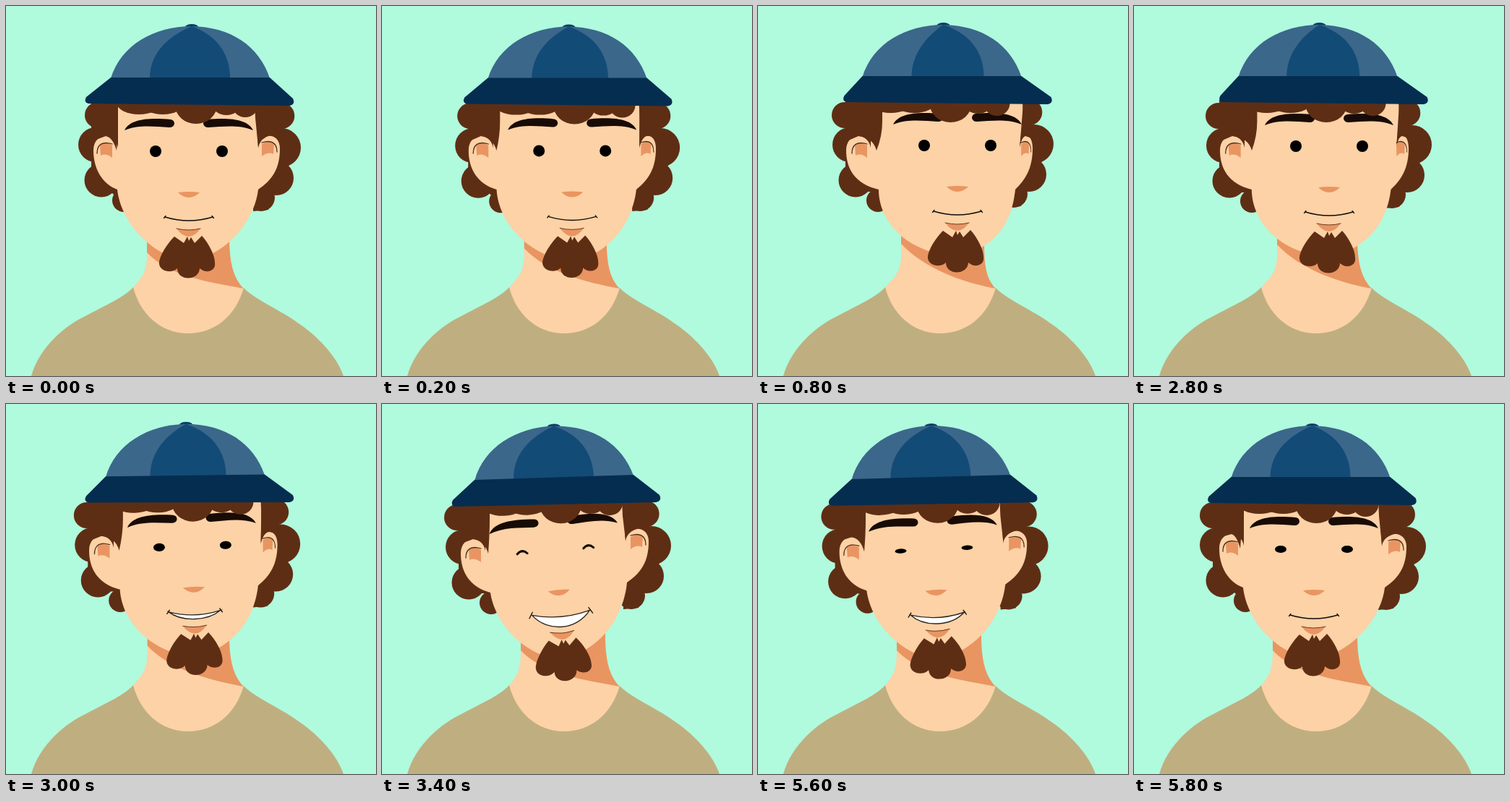
An HTML page with a canvas for the animation above (6000 ms loop, 512 by 512 pixels).

```html
<!DOCTYPE html>
<html lang="en">
<head>
<meta charset="utf-8">
<title>Portrait</title>
<style>
  html, body { margin: 0; width: 100%; height: 100%; overflow: hidden; background: #b0fade; }
  canvas { display: block; width: 512px; height: 512px; }
</style>
</head>
<body>
<canvas id="stage" width="512" height="512"></canvas>
<script>
const ctx = document.getElementById('stage').getContext('2d');
const SKIN = '#fcd2a6', SHADE = '#e99562', HAIR = '#5e2e14', INK = '#120c0a';

// Poses
const FIELDS = ('hatX hatY hatRot brim topL hairL hairR yL yR earL earR ' +
  'tipL tipR neckL neckR noseX noseY turn smile lid').split(' ');
const pose = (...values) => Object.fromEntries(FIELDS.map((name, i) => [name, values[i]]));
const mix = (a, b, k) => pose(...FIELDS.map(name => a[name] + (b[name] - a[name]) * k));
const pick = (p, names) => Object.fromEntries(names.map(name => [name, p[name]]));

const front  = pose(255, 99, 0, 0, 109, 100, 408, -2, 0, 121, 379, 153, 349, 195, 309, 253, 261, 0, 0, 0);
const turned = pose(257.5, 100, 0, 3, 101, 102, 415, 0, 0, 119, 379, 162, 361, 198, 312, 270, 260, .8, 0, 0);
const raised = pose(254.5, 97, 0, 9, 102, 103, 409, -2, -5, 122, 380, 164, 362, 198, 313, 276, 253, 1, 0, 0);
const back   = pose(254.5, 97, 0, 9, 99, 100, 412, -1, -4, 119, 380, 163, 363, 198, 309, 270, 254, .9, 0, 0);
const laugh  = pose(238, 101.5, -.032, 3, 86, 88, 400, 4, 0, 109, 369, 147, 337, 192, 309, 245, 261, 0, 1, 1);
const blink  = pose(244.5, 101, 0, 3, 91, 91, 404, 1, 1, 118, 377, 147, 343, 192, 309, 249, 261, 0, 0, .5);
const tipped = { ...laugh, hatX: 236, hatY: 101, hatRot: -.044, topL: 85, hairL: 87 };

const LOOP = 6000;
const timeline = [
  [0, front],
  [200, mix(front, turned, .6)],
  [400, turned],
  [600, { ...mix(turned, raised, .5), ...pick(turned, FIELDS.slice(0, 9)) }],
  [800, raised],
  [2800, back],
  [3000, mix(back, laugh, .4)],
  [3200, mix(back, laugh, .75)],
  [3400, laugh],
  [5400, tipped],
  [5600, mix(tipped, blink, .4)],
  [5800, blink],
];

// Drawing helpers
function fill(color, d) {
  ctx.fillStyle = color;
  ctx.fill(new Path2D(d));
}

function line(d, width = 1.3, color = INK) {
  ctx.strokeStyle = color;
  ctx.lineWidth = width;
  ctx.lineCap = 'round';
  ctx.stroke(new Path2D(d));
}

function oval(color, x, y, rx, ry = rx) {
  ctx.fillStyle = color;
  ctx.beginPath();
  ctx.ellipse(x, y, rx, ry, 0, 0, 7);
  ctx.fill();
}

function group(x, y, angle, scaleX, draw) {
  ctx.save();
  ctx.translate(x, y);
  ctx.rotate(angle);
  ctx.scale(scaleX, 1);
  draw();
  ctx.restore();
}

function drawHair({ topL, hairL: l, hairR: r, yL, yR }) {
  fill(HAIR, `M${l + 18} 130H${r - 30}V${245 + yR}L${r - 40} ${262 + yR}H${l + 50}L${l + 18} 230Z`);
  oval(HAIR, topL + 18, 153 + yL, 18);
  oval(HAIR, l + 24, 194 + yL, 24);
  oval(HAIR, l + 32, 243 + yL, 23.5);
  oval(HAIR, l + 63, 271 + yL, 16);
  oval(HAIR, r - 33 + (topL - l) * .7, 152 + yR, 18);
  oval(HAIR, r - 27, 196 + yR, 27);
  oval(HAIR, r - 34, 238 + yR, 24);
  oval(HAIR, r - 55, 265 + yR, 19);
  fill(HAIR, `M${r - 66} ${240 + yR}v44l21-2l7-27Z`);
}

function drawBody({ neckL: l, neckR: r, turn }) {
  const y = 341 - turn * 12;
  fill(SKIN, `M${l} 290V345C${l} 372 183 380 176 390V460H329V391C313 378 ${r} 350 ${r} 320V290Z`);
  fill(SHADE, `M${l} 290V${y}C${l + 31} ${y + 33} 280 382 329 391C313 375 ${r} 350 ${r} 320V290Z`);
  fill('#bfaf80', 'M35 512C47 470 84 441 110 429C140 413 165 402 176 389C185 425 213 453 252 453' +
    'C290 453 318 428 329 390C345 407 381 421 406 440C436 460 460 490 467 512Z');
}

function drawEar() {
  fill(SHADE, 'M-8-8Q1-13 9-7V10Q0 3-7 7Z');
  line('M-12 4C-12-9-4-13 9-9', 1.3, '#4a3020');
}

function drawFace({ earL: l, earR: r, tipL, tipR, hairL, hairR, noseX, noseY, turn, smile }) {
  const dy = smile * 7;
  const yl = 200 + dy, yr = 197 - dy;
  const sideL = tipL + 2 + turn * 6, sideR = tipR - 5 + turn * 9;
  const jawL = l + 33 + turn * 12 + smile * 8, jawR = r - 30 + turn * 6;
  const chin = noseY + 94;
  fill(SKIN, `M${l} ${yl}C${l} ${yl - 26} ${l + 30} ${yl - 26} ${l + 34} ${yl - 4}
    V135H${sideR + 1}L${tipR} ${yr}C${tipR + 2} ${yr - 23} ${r} ${yr - 23} ${r} ${yr}
    C${r} ${yr + 28} ${r - 10} ${yr + 43} ${jawR} ${yr + 57}
    C${jawR - 4} 290 ${noseX + 62} ${chin - 15} ${noseX} ${chin}
    C${noseX - 65 - turn * 9} ${chin - 15 + turn * 9} ${jawL + 4 - turn * 4} ${290 + turn * 6} ${jawL} ${yl + 54}
    C${l + 12} ${yl + 46} ${l} ${yl + 25} ${l} ${yl}Z`);

  fill(HAIR, `M${hairL + 20} 132H${sideL}V160Q${sideL} 180 ${tipL} ${yl}
    Q${tipL - 5} ${yl - 18} ${l + 17} ${yl - 20}L${hairL + 22} ${yl - 14}Z`);
  fill(HAIR, `M${hairR - 32} 132H${sideR}L${sideR + 1} 155L${tipR} ${yr - 2}
    Q${tipR + 4} ${yr - 15} ${r - 13} ${yr - 18}L${hairR - 30} ${yr - 14}Z`);

  group(l + 17 + turn * 3 + smile * 2, yl + smile * 2, 0, 1, drawEar);
  group(r - 16 + turn * 6, yr + 1, 0, turn * .35 - 1, drawEar);
}

function drawMouth(smile) {
  const half = 33 + smile * 7, y = 31 - smile * 3;
  const upper = `M${-half} ${y}Q0 ${41 - smile * 2} ${half} ${y}`;
  if (smile) {
    const low = y + 7 + smile * 19;
    const teeth = `${upper}C${half * .5} ${low} ${-half * .5} ${low} ${-half} ${y}Z`;
    fill('#fff', teeth);
    line(teeth, 1.4, '#2d2620');
  } else {
    line(upper, 1.5);
  }
  const tick = 1.5 + smile * 2.5;
  for (const side of [-1, 1]) {
    line(`M${side * (half + tick)} ${y + tick}L${side * (half - 1)} ${y - tick}`);
  }
}

function drawFeatures({ noseX, noseY, smile, lid }) {
  group(noseX, noseY, smile * -.087, 1, () => {
    for (const side of [-1, 1]) {
      group(0, 0, 0, side, () => {
        fill('#180b06', 'M-89-89C-82-104-58-107-25-104Q-20-103-20-98Q-21-93-27-93C-48-94-69-97-89-89Z');
      });
      if (lid > .9) line(`M${side * 46 - 7}-58q7-7 14 0`, 3);
      else oval('#000', side * 46, -60, 8, 8 - lid * 6);
    }
    fill(SHADE, 'M-15-3Q0-5 15-3Q8 4 0 4Q-8 4-15-3Z');
    drawMouth(smile);
    ctx.translate(0, smile * 7);
    fill(SHADE, 'M-17 47Q0 51 16 47Q8 58 0 58Q-9 58-17 47Z');
    line('M-17 47Q0 51 16 47', 1, '#6b3c22');
    fill(HAIR, 'M-20 58C-32 70-42 88-41 96C-40 106-24 110-16 102C-16 120 14 120 15 102' +
      'C24 110 38 106 36 94C36 84 28 68 18 57L8 67L3 59L0 64L-2 58L-7 67Z');
  });
}

function drawHat({ hatX, hatY, hatRot, brim: b, turn }) {
  group(hatX, hatY, hatRot, 1, () => {
    oval(HAIR, -71, 35, 31, 16);
    oval(HAIR, -38, 35, 30, 16);
    oval(HAIR, 8 + turn * 4, 38, 29, 26);
    oval(HAIR, 50, 36, 20, 16);
    oval(HAIR, 76, 38, 18, 17);
    oval('#0c3d66', 2, -70, 9, 4);
    fill('#3b678b', 'M-110 1C-96-45-50-71 2-71C56-70 95-44 110 1Z');
    const l = -56 + turn * 14, r = 55 + turn * 3;
    fill('#134b77', `M${l} 1C${l}-30 ${l + 20}-55 2-71C${r - 17}-58 ${r}-31 ${r} 1Z`);
    fill('#052d50', `M-110 0H110L${142 + b} 29Q${146 + b} 37 ${137 + b} 39L${-141 + b} 36
      Q${-148 + b} 34 ${-144 + b} 27Z`);
  });
}

function render() {
  const t = performance.now() % LOOP;
  const current = timeline.findLast(([start]) => start <= t)[1];
  ctx.fillStyle = '#b0fade';
  ctx.fillRect(0, 0, 512, 512);
  for (const draw of [drawHair, drawBody, drawFace, drawFeatures, drawHat]) draw(current);
  requestAnimationFrame(render);
}
render();
</script>
</body>
</html>
```
